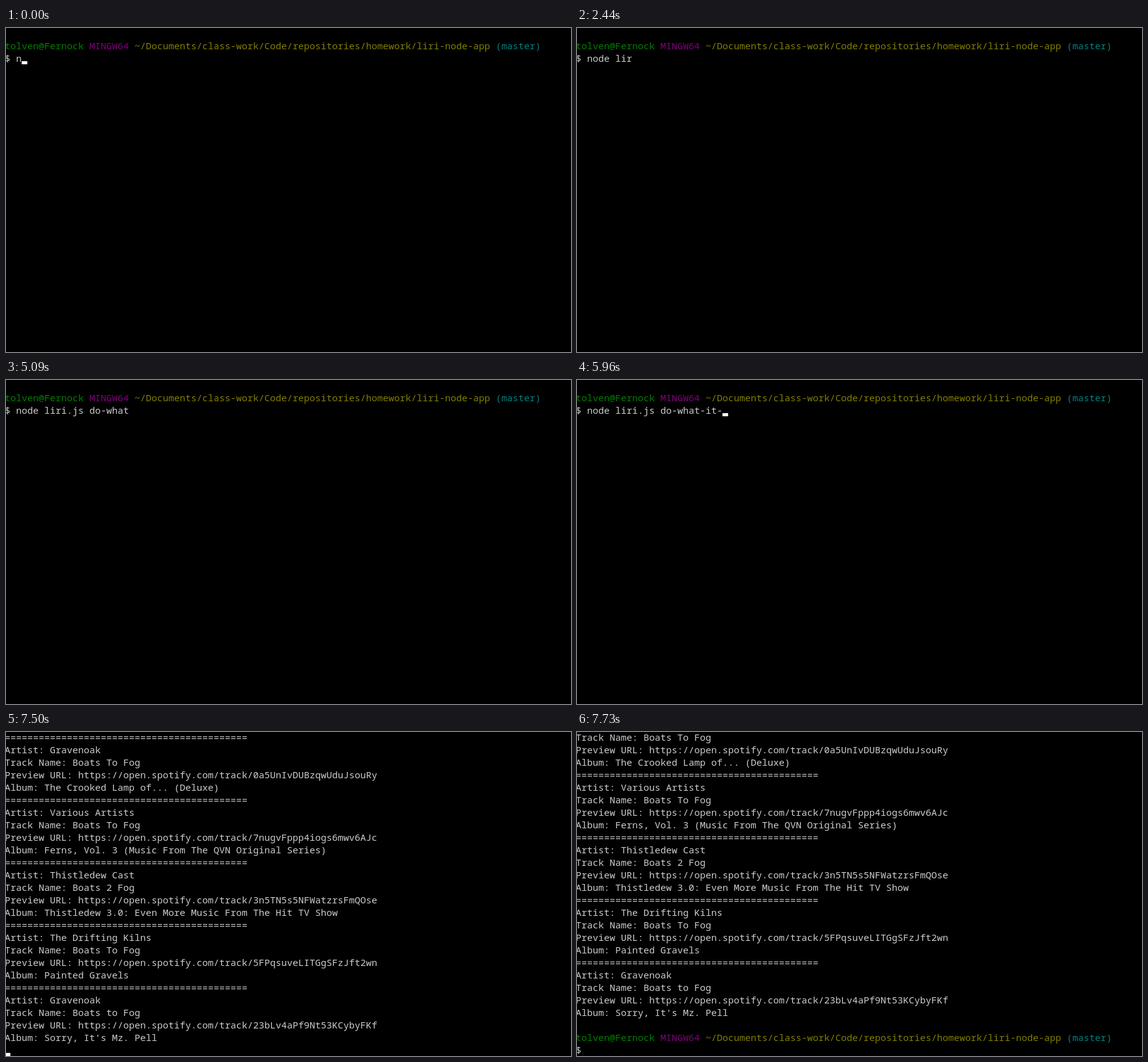
Write an HTML page that moves like this. It is 901x518 px and loops after 8 s.

```html
<!DOCTYPE html>
<html lang="en">
<head>
<meta charset="utf-8">
<title>Terminal session</title>
<style>
  html, body { margin: 0; width: 100%; height: 100%; overflow: hidden; background: #000; }
  svg { display: block; }
  text {
    font: 15px "Noto Sans Mono", "DejaVu Sans Mono", monospace;
    fill: #ccc;
    white-space: pre;
  }
</style>
</head>
<body>
<svg id="stage" width="901" height="518" viewBox="0 0 901 518">
  <rect width="901" height="518" fill="#000"/>
  <g id="output"></g>
  <text id="prompt"></text>
  <text id="command"></text>
  <rect id="cursor" width="9" height="5" fill="#fff"/>
</svg>
<script>
const NS = "http://www.w3.org/2000/svg";
const LOOP = 8000, CELL = 9, ROW = 20, LEFT = -2;
const BLINK = 527, FIRST_BLINK = 329;
const ENTER_AT = 6950, OUTPUT_AT = 7500, PROMPT_AT = 7650;
const $ = id => document.getElementById(id);
const baseline = row => 14 + row * ROW;

// Bursts of typing: start ms, ms between keys, keys (tab completion adds several letters at once)
const BURSTS = [
  [0, 0, "n"],
  [100, 195, "ode"],
  [1360, 0, " "],
  [2210, 110, "lir"],
  [2690, 0, ["i.js "]],
  [4180, 120, "do"],
  [4530, 115, "-what"],
  [5230, 130, "-it"],
  [5960, 0, "-"],
  [6270, 100, "says"]
];
const KEYS = BURSTS.flatMap(([start, gap, keys]) =>
  [...keys].map((text, i) => ({ at: start + i * gap, text })));

const TRACKS = [
  ["Gravenoak", "Boats To Fog", "0a5UnIvDUBzqwUduJsouRy", "The Crooked Lamp of... (Deluxe)"],
  ["Various Artists", "Boats To Fog", "7nugvFppp4iogs6mwv6AJc", "Ferns, Vol. 3 (Music From The QVN Original Series)"],
  ["Thistledew Cast", "Boats 2 Fog", "3n5TN5s5NFWatzrsFmQOse", "Thistledew 3.0: Even More Music From The Hit TV Show"],
  ["The Drifting Kilns", "Boats To Fog", "5FPqsuveLITGgSFzJft2wn", "Painted Gravels"],
  ["Gravenoak", "Boats to Fog", "23bLv4aPf9Nt53KCybyFKf", "Sorry, It's Mz. Pell"]
];

const PROMPT = [
  ["tolven@Fernock ", "#008000"],
  ["MINGW64 ", "#800080"],
  ["~/Documents/class-work/Code/repositories/homework/liri-node-app ", "#808000"],
  ["(master)", "#008080"]
];

function add(parent, tag, content, attrs) {
  const node = document.createElementNS(NS, tag);
  for (const key in attrs) node.setAttribute(key, attrs[key]);
  node.textContent = content;
  parent.append(node);
}

function place(node, col, y) {
  node.setAttribute("x", LEFT + col * CELL);
  node.setAttribute("y", y);
}

function show(node, visible) {
  node.setAttribute("visibility", visible ? "visible" : "hidden");
}

TRACKS.flatMap(([artist, track, id, album]) => [
  "=".repeat(43),
  "Artist: " + artist,
  "Track Name: " + track,
  "Preview URL: https://open.spotify.com/track/" + id,
  "Album: " + album
]).forEach((line, row) => add($("output"), "text", line, { x: LEFT, y: baseline(row) }));

PROMPT.forEach(([part, color]) => add($("prompt"), "tspan", part, { style: "fill:" + color }));

const blinks = t => Math.floor((t - FIRST_BLINK) / BLINK);

// Any key or printed text shows the cursor; every blink since then flips it.
function cursorOn(t) {
  const marks = [...KEYS.map(key => key.at), ENTER_AT, OUTPUT_AT, PROMPT_AT];
  const last = Math.max(...marks.filter(at => at <= t));
  return (blinks(t) - blinks(last)) % 2 === 0;
}

function render(t) {
  const printed = t >= OUTPUT_AT;
  const done = t >= PROMPT_AT;
  const promptRow = done ? 24 : 1;
  const typed = done ? "" : KEYS.filter(key => key.at <= t).map(key => key.text).join("");

  show($("output"), printed);
  $("output").setAttribute("transform", `translate(0 ${done ? -2 * ROW : 0})`);

  for (const id of ["prompt", "command"]) show($(id), !printed || done);
  place($("prompt"), 0, baseline(promptRow));
  place($("command"), 0, baseline(promptRow + 1));
  $("command").textContent = "$ " + typed;

  const waiting = t >= ENTER_AT && !done;
  const row = waiting ? (printed ? 25 : 3) : promptRow + 1;
  place($("cursor"), waiting ? 0 : 2 + typed.length, baseline(row) - 1);
  show($("cursor"), cursorOn(t));
}

const start = performance.now();
function tick() {
  render((performance.now() - start) % LOOP);
  requestAnimationFrame(tick);
}
tick();
</script>
</body>
</html>
```
